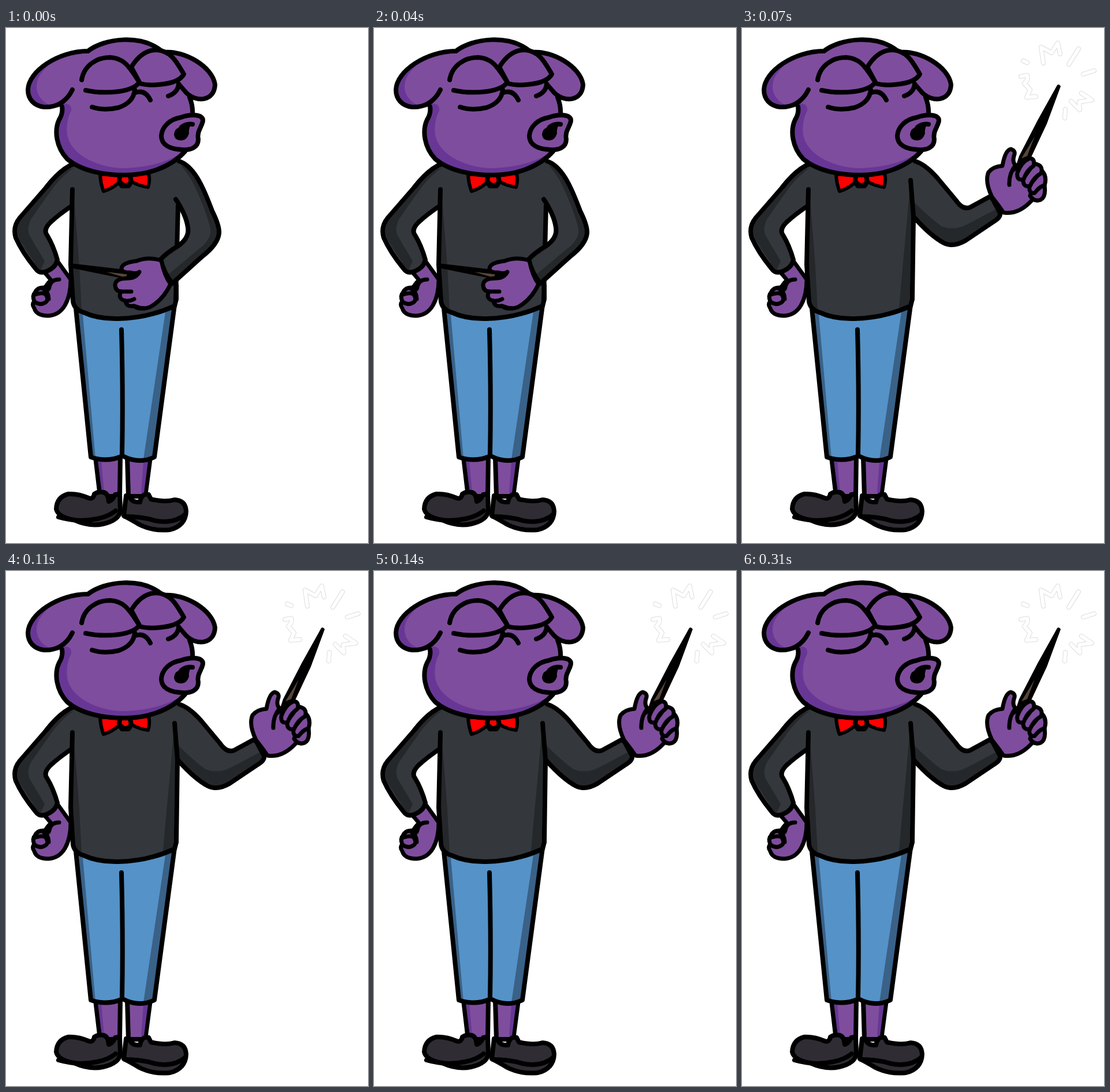
Animation of 627 by 893 pixels, one loop 0.42 s. Source, as an HTML page:

```html
<!DOCTYPE html>
<html lang="en">
<head>
<meta charset="utf-8">
<title>Conductor</title>
<style>
html, body { margin: 0; width: 100%; height: 100%; overflow: hidden; background: #fff; }
svg { display: block; width: 100%; height: 100%; }
path { fill: none; stroke: #000; stroke-width: 8; stroke-linecap: round; stroke-linejoin: round; }
.skin { fill: #7f4d9d; }
.knit { fill: #34373c; }
.jean { fill: #5592c7; }
.shoe { fill: #302c34; }
.red { fill: #f00; stroke-width: 6; }
.flat { stroke: none; }
.skin.flat, .knit.flat { stroke: none; }
.skinDark { fill: #683795; stroke: none; }
.knitDark { fill: #25282b; stroke: none; }
.jeanDark { fill: #3a6187; stroke: none; }
.ink { fill: #000; stroke: none; }
.wood { fill: #584638; stroke: none; }
.thin path { stroke-width: 7; }
#sparks .edge { stroke: #ddd; stroke-width: 8; }
#sparks .core { stroke: #fff; stroke-width: 6; }
</style>
</head>
<body>
<svg viewBox="0 0 627 893">
  <!-- hand on hip -->
  <g class="thin">
    <path class="skin" d="M67 424L78 437Q70 445 68 450Q54 449 50 459Q45 464 49 474Q44 479 49 486Q53 499 73 499Q92 498 102 481Q112 464 112 436L89 404Z"/>
    <path d="M92 436Q77 436 75 450Q73 457 66 451M51 462Q66 457 70 464Q75 473 66 477Q58 481 50 475M64 452Q74 458 74 470"/>
  </g>

  <!-- legs and shoes -->
  <path class="skin" d="M155 744L163 812H197L198 744ZM210 744L212 812H241L250 744Z"/>
  <path class="skinDark" d="M159 750H165L170 806H166ZM238 752H246L239 806H234Z"/>
  <path class="shoe" d="M153 808Q151 818 143 815Q125 807 108 808Q88 813 87 834Q90 848 118 853Q145 865 168 860Q195 854 198 838L197 808L189 809Q185 819 178 821Q177 807 169 805Q160 803 153 808Z"/>
  <path class="shoe" d="M208 811L204 846Q216 852 231 861Q255 873 284 870Q311 863 312 838Q311 819 292 818Q276 823 251 817L247 809Q235 806 232 822Q217 823 214 812Z"/>
  <path d="M91 848Q125 858 158 851Q178 847 190 837M206 847Q235 847 257 854Q290 861 311 843" stroke-width="6"/>

  <!-- trousers -->
  <path class="jean flat" d="M121 486L147 744Q175 754 202 742Q230 757 257 744L292 480Z"/>
  <path class="jeanDark" d="M121 486H132L155 747L147 744ZM277 486H292L257 744L238 748Z"/>
  <path d="M121 486L147 744Q175 754 202 742Q230 757 257 744L292 480M200 523Q203 640 201 740"/>

  <!-- sweater -->
  <path class="knit" d="M118 235Q94 245 70 276L24 329Q11 345 17 364Q28 389 51 417Q58 427 70 422Q86 416 89 402Q82 377 71 359Q64 350 77 337Q92 323 116 307L140 260Z"/>
  <path class="knitDark" d="M106 246Q94 254 72 280L28 330Q15 346 22 365L55 416L60 420L67 404L42 362Q35 350 43 332L78 282Q95 258 118 242Z"/>
  <path class="knit flat" d="M118 235L115 280L112 410L116 474Q118 488 134 493Q160 505 195 504Q246 503 292 482L295 470L299 310L300 231Z"/>
  <path class="knitDark" d="M117 282L127 412L131 490L117 476L114 412Z"/>

  <g id="rest">
    <path d="M298 308L294 470"/>
    <path class="knit flat" d="M300 231C328 240 345 285 357 317Q370 343 369 356Q367 375 340 396L288 443Q273 424 268 401Q278 390 298 378Q318 364 315 346Q312 324 294 297L285 260Z"/>
    <path class="knitDark" d="M304 234C328 240 345 285 357 317Q370 343 369 356Q367 375 340 396L288 443L279 429L338 380Q356 365 354 348Q347 318 328 277Q318 255 304 240Z"/>
    <path d="M300 231C328 240 345 285 357 317Q370 343 369 356Q367 375 340 396L288 443Q273 424 268 401Q278 390 298 378Q318 364 315 346Q312 324 294 297"/>
    <path class="ink" d="M112 408L206 419L232 424L206 435L112 416Z"/>
    <path class="wood" d="M174 423L210 427L207 433Z"/>
    <g class="thin">
      <path class="skin" d="M269 403Q246 396 226 404Q200 407 200 418Q201 424 215 424Q226 427 231 423Q225 434 211 434Q190 434 189 445Q189 456 199 457Q193 470 207 473Q208 484 221 482Q233 490 249 484Q272 472 285 444Q274 429 269 403Z"/>
      <path d="M199 457H217M207 473Q215 474 222 470M222 482Q231 486 240 486"/>
    </g>
  </g>

  <g id="raised" display="none">
    <path class="knitDark" d="M292 264L271 495L292 482L295 470L297 325Z"/>
    <path class="knit flat" d="M300 231Q319 237 340 262L370 298Q382 316 395 311L428 293Q433 292 438 304L447 321Q448 327 440 333L388 368Q366 381 350 373Q326 360 297 327L290 260Z"/>
    <path class="knitDark" d="M297 301Q325 329 346 344Q367 352 389 341L444 312L447 321L440 333L388 368Q366 381 350 373Q326 360 297 327Z"/>
    <path d="M300 231Q319 237 340 262L370 298Q382 316 395 311L428 293Q433 292 438 304L447 321Q448 327 440 333L388 368Q366 381 350 373Q326 360 297 327M292 264L297 327L295 470"/>
    <g class="thin">
      <path class="skin" d="M433 293Q420 266 427 250Q435 240 451 239Q456 211 466 210Q475 213 471 222Q468 233 474 238L500 270L514 296Q505 294 499 302Q477 324 453 320Q444 307 433 293Z"/>
      <path d="M474 238Q462 253 463 272"/>
      <path class="ink" d="M546 99Q549 96 552 101L528 166L499 228L471 250L480 222L512 160Z"/>
      <path class="wood" d="M507 188L494 222L484 226Z"/>
      <path class="skin" d="M499 291Q506 302 517 298Q527 293 524 273L503 278Z"/>
      <path class="skin" d="M498 273Q496 288 507 286Q515 275 524 273Q529 257 519 247Z"/>
      <path class="skin" d="M487 261Q486 277 499 274Q505 259 518 252Q523 238 506 235Z"/>
      <path class="skin" d="M477 251Q475 266 488 262Q493 247 505 239Q508 226 498 226Q484 232 477 251Z"/>
    </g>
    <g id="sparks"></g>
  </g>

  <path d="M118 235Q94 245 70 276M115 280L112 410L116 474Q118 488 134 493Q160 505 195 504Q246 503 292 482L295 470V446"/>

  <!-- bow tie -->
  <path class="red" d="M163 254Q164 271 169 283Q184 279 198 266Q207 278 217 266Q230 274 246 276Q250 265 247 252Z"/>
  <path d="M197 260Q194 266 201 274H212Q219 266 215 258" stroke-width="6"/>

  <!-- head -->
  <path class="skin flat" d="M142 40C165 20 235 10 272 42C310 38 358 68 362 98C361 122 336 130 318 118Q325 135 322 152L310 214C285 242 245 255 205 255C140 254 86 225 87 178Q88 164 97 151V136C70 144 38 132 38 107C39 75 90 40 142 40Z"/>
  <path class="skinDark" d="M96 48C60 58 38 83 38 107C38 132 62 139 82 136C50 126 46 96 63 76Q75 60 96 48ZM100 131Q114 130 113 143Q103 163 106 185C112 220 160 243 205 243Q265 242 310 214C285 242 245 255 205 255C140 254 86 225 87 178Q88 164 97 151Z"/>
  <path d="M115 107C104 130 85 138 66 137C48 135 38 123 38 107C39 75 90 40 142 40C170 18 235 9 272 42C310 38 358 68 362 98C361 127 330 130 312 112L299 97M318 120Q324 135 323 150M97 136Q99 148 92 159C83 178 87 207 106 227C130 248 170 255 205 255C245 255 285 242 310 214"/>
  <path class="skin" d="M131 90C135 65 157 51 180 51C207 52 216 72 231 94Q223 106 196 110Q165 114 138 108"/>
  <path class="skin flat" d="M217 68Q235 38 261 38C286 40 295 58 308 80Q300 95 266 98L231 97Z"/>
  <path d="M217 68Q235 38 261 38C286 40 295 58 308 80Q300 95 266 98Q245 100 231 96M217 68L231 94M149 137Q170 144 195 138Q221 129 223 107M224 112Q241 106 250 125M299 97Q298 112 281 118"/>
  <path class="skin" d="M303 155C320 149 342 149 341 161C339 172 330 180 333 193C333 208 319 212 305 211C284 210 269 203 269 187C270 171 284 158 303 155Z"/>
  <path class="ink" d="M291 184Q292 174 304 170L319 170Q316 177 317 183Q313 196 302 195Q291 194 291 184Z"/>
  <path d="M304 172Q313 165 323 167" stroke-width="7"/>
</svg>
<script>
const LOOP = 420, RAISE = 70;
const get = id => document.getElementById(id);
const rays = [
  "M487 57L494 60",
  "M483 84L494 82Q497 88 489 96L499 107L493 120L509 119",
  "M522 61L518 33L536 43L547 26L551 45",
  "M566 63L583 36",
  "M591 80L610 74",
  "M570 127L585 142L584 128L606 125L588 113",
  "M560 141L559 156"
].join("");
get("sparks").innerHTML = ["edge", "core"].map(c => `<path class="${c}" d="${rays}"/>`).join("");

function draw() {
  const up = performance.now() % LOOP >= RAISE;
  get("rest").setAttribute("display", up ? "none" : "inline");
  get("raised").setAttribute("display", up ? "inline" : "none");
  requestAnimationFrame(draw);
}
draw();
</script>
</body>
</html>
```
